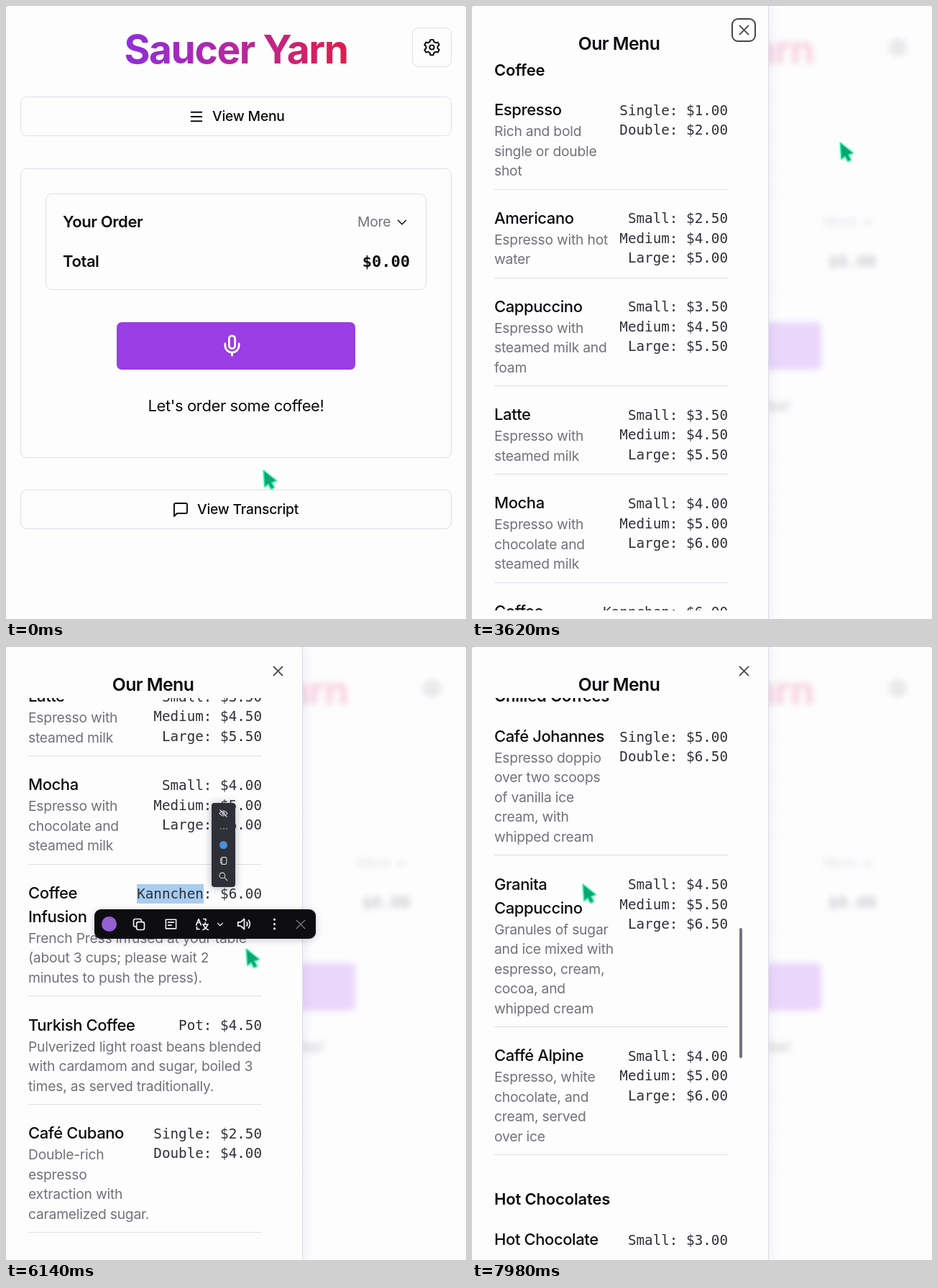
These frames come from a looping animation (640x853 px, 8 s). An HTML page:

```html
<!DOCTYPE html>
<html lang="en">
<head>
<meta charset="utf-8">
<title>Saucer Yarn</title>
<style>
  :root { --paper: #fdfdfe; --line: #dedee8; --ink: #0c0c10; --soft: #71717a; --mic: #fff; }
  html, body { margin: 0; width: 100%; height: 100%; overflow: hidden; background: #000; }
  #stage { position: relative; width: 640px; height: 853px; overflow: hidden; border-radius: 2px 2px 0 0;
    background: var(--paper); color: var(--ink); font: 400 19.25px/27.5px Inter, sans-serif;
    font-optical-sizing: none; letter-spacing: -.011em; }
  #stage div, svg { position: absolute; box-sizing: border-box; white-space: nowrap; }
  svg { fill: none; stroke: currentColor; stroke-linecap: round; stroke-linejoin: round; overflow: visible; }
  .page { inset: 0; background: var(--paper); }
  .box { border: 1px solid var(--line); border-radius: 9px; }
  .big { font-size: 22px; letter-spacing: -.018em; }
  .mono { font-family: "DejaVu Sans Mono", monospace; letter-spacing: 0; }
  .semi { font-weight: 600; }
  .medium { font-weight: 500; }
  .soft { color: var(--soft); }
  .title { left: 0; width: 640px; top: 26px; text-align: center; font-weight: 700; font-size: 55px; line-height: 68px; }
  .title span { letter-spacing: -.025em; color: transparent; background: linear-gradient(90deg, #8e2edb, #b627a0 50%, #e11d48);
    -webkit-background-clip: text; background-clip: text; }
  .mic { background: #9a3de4; border-radius: 7px; }
  .mic-icon { color: var(--mic); }

  .ghost { color: #cacace; --soft: #e4e4e8; --line: #f5f5f9; --mic: #e9d7fb; }
  .ghost > * { filter: blur(4.5px); }
  .ghost .title span { background-image: linear-gradient(90deg, #e9d6fb, #f9d0da); }
  .ghost .mic { background: #e9d7fb; }

  #sheet { left: 0; top: 0; width: 413px; height: 853px; background: var(--paper);
    border-right: 1px solid #dcdce6; box-shadow: 0 0 16px rgba(120, 120, 150, .16); }
  .sheet-title { left: 0; width: 409px; text-align: center; top: 39px; font-size: 24.75px; letter-spacing: -.022em; }
  #view { left: 0; top: 71px; width: 412px; height: 770px; overflow: hidden; }
  #list { left: 31px; top: 1.5px; width: 325px; }
  #stage #list div { position: relative; }
  #list .head { height: 33px; line-height: 33px; margin-bottom: 22.5px; letter-spacing: -.007em; }
  #list .item + .head { margin-top: 45.3px; }
  #list .item { padding-bottom: 11px; border-bottom: 1px solid var(--line); margin-bottom: 23.1px; }
  #list .item:has(+ .head) { margin-bottom: 0; }
  #list .name { line-height: 33px; }
  #stage #list .price { position: absolute; right: 0; top: 3.7px; text-align: right; color: #303038; }
  #thumb { left: 372px; width: 4px; height: 181px; border-radius: 2px; background: #72727e; }
  #ring { left: 361px; top: 17px; width: 34px; height: 33px; border: 2.5px solid #44444e; border-radius: 9px; }
  .close { color: #44444c; }
  .picked { background: #a9cdf0; padding: 2px 0; }
  .bar { left: 123px; top: 365px; width: 308px; height: 41px; border-radius: 9px; background: #0e0e12; color: #f2f2f5;
    box-shadow: 0 2px 10px rgba(60, 60, 90, .25); }
  .strip { left: 286px; top: 217px; width: 33px; height: 117px; border-radius: 4px; background: #2f2f38; color: #d8d8de;
    box-shadow: 0 1px 12px rgba(60, 60, 90, .4); }
  .dot { border-radius: 50%; }
  .blue { background: #4a90d6; }
  .violet { background: #9560d4; }
  .dim { color: #777780; }
  #cursor { left: 0; top: 0; width: 1px; height: 1px; fill: #0aa574; stroke: #2be39a; filter: drop-shadow(0 0 1.5px #7df0c0); }
</style>
</head>
<body>
<div id="stage"></div>
<script>
const stage = document.getElementById('stage');
const $ = id => document.getElementById(id);

const box = (x, y, w, h, cls) =>
  `<div class="${cls}" style="left:${x}px;top:${y}px;width:${w}px;height:${h}px"></div>`;
// Text is placed by its left edge (or right edge) and vertical centre.
const text = (x, cy, cls, str, side = 'left') =>
  `<div class="${cls}" style="${side}:${x}px;top:${cy - 13.75}px">${str}</div>`;
const icon = (cx, cy, size, body, weight = 2) =>
  `<svg viewBox="0 0 24 24" width="${size}" height="${size}" stroke-width="${weight}"
    style="left:${cx - size / 2}px;top:${cy - size / 2}px">${body}</svg>`;
const path = d => `<path d="${d}"/>`;

function gear() {
  const points = [];
  for (let tooth = 0; tooth < 6; tooth++)
    for (const [offset, r] of [[-21, 7.8], [-11, 10.4], [11, 10.4], [21, 7.8]]) {
      const a = (tooth * 60 + offset) * Math.PI / 180;
      points.push(`${(12 + r * Math.sin(a)).toFixed(2)} ${(12 - r * Math.cos(a)).toFixed(2)}`);
    }
  return path(`M${points.join('L')}Z`) + '<circle cx="12" cy="12" r="3"/>';
}

const chevron = path('M6 9l6 6 6-6');
const cross = path('M5 5l14 14M19 5L5 19');
const mic = path('M12 2a3 3 0 0 0-3 3v7a3 3 0 0 0 6 0V5a3 3 0 0 0-3-3ZM19 10v2a7 7 0 0 1-14 0v-2M12 19v3');
const bubble = path('M21 15a2 2 0 0 1-2 2H7l-4 4V5a2 2 0 0 1 2-2h14a2 2 0 0 1 2 2Z');
const copy = path('M16 8V6a3 3 0 0 0-3-3H6a3 3 0 0 0-3 3v7a3 3 0 0 0 3 3h2M11 8h7a3 3 0 0 1 3 3v7a3 3 0 0 1-3 3h-7a3 3 0 0 1-3-3v-7a3 3 0 0 1 3-3Z');
const note = path('M3 4h18v16H3ZM7 9h10M7 14h6');
const translate = path('M2 13L6 3l4 10M4 9h4M13 12h9M17 9v3M21 12q-2 7-8 9M14 13q2 6 8 8M14 3h4v3M3 16v4h4');
const speaker = path('M2 9h4l6-5v16l-6-5H2ZM16 9q2 3 0 6M19 6q4 6 0 12');
const dots = path('M12 4v.1M12 12v.1M12 20v.1');
const eyeOff = path('M2 12q10-13 20 0q-10 13-20 0M3 3l18 18') + '<circle cx="12" cy="12" r="3"/>';
const ellipsis = path('M4 12h.1M12 12h.1M20 12h.1');
const sheets = path('M8 3h9a3 3 0 0 1 3 3v12a3 3 0 0 1-3 3H8ZM8 6H5v12h3');
const search = path('M15 15l7 7') + '<circle cx="9" cy="9" r="7"/>';

const pageHtml =
  '<div class="title"><span>Saucer Yarn</span></div>' +
  box(565, 30, 55, 55, 'box btn') + icon(592.5, 57.5, 25, gear(), 1.9) +
  box(20, 126, 600, 55, 'box btn') + icon(264.5, 154, 22, path('M4 5.2h16M4 12h16M4 18.8h16')) +
  text(287, 154, 'medium', 'View Menu') +
  box(20, 226, 600, 403, 'box') + box(55, 261, 530, 134, 'box') +
  text(79, 301, 'big semi', 'Your Order') +
  text(489, 301, 'soft', 'More') + icon(551, 300.5, 22, chevron, 1.6) +
  text(79, 356, 'big semi', 'Total') +
  text(78, 356, 'big mono semi', '$0.00', 'right') +
  box(154, 440, 332, 66, 'mic') +
  `<div class="mic-icon">${icon(314.5, 472.5, 33, mic)}</div>` +
  '<div class="big" style="left:0;width:640px;text-align:center;top:543px">Let\'s order some coffee!</div>' +
  box(20, 673, 600, 55, 'box btn') + icon(243, 701, 24, bubble, 1.9) +
  text(266, 701, 'medium', 'View Transcript');

// A plain string is a section heading; an item is name, description, prices ("/" breaks a line).
const sizes = (...p) => ['Small', 'Medium', 'Large'].map((s, i) => p[i] && `${s}: $${p[i]}`).filter(Boolean).join('/');
const shots = (a, b) => `Single: $${a}/Double: $${b}`;
const menu = [
  'Coffee',
  ['Espresso', 'Rich and bold/single or double/shot', shots('1.00', '2.00')],
  ['Americano', 'Espresso with hot/water', sizes('2.50', '4.00', '5.00')],
  ['Cappuccino', 'Espresso with/steamed milk and/foam', sizes('3.50', '4.50', '5.50')],
  ['Latte', 'Espresso with/steamed milk', sizes('3.50', '4.50', '5.50')],
  ['Mocha', 'Espresso with/chocolate and/steamed milk', sizes('4.00', '5.00', '6.00')],
  ['Coffee/Infusion', 'French Press infused at your table/(about 3 cups; please wait 2/minutes to push the press).',
    '<span id="word">Kannchen</span>: $6.00'],
  ['Turkish Coffee', 'Pulverized light roast beans blended/with cardamom and sugar, boiled 3/times, as served traditionally.', 'Pot: $4.50'],
  ['Café Cubano', 'Double-rich/espresso/extraction with/caramelized sugar.', shots('2.50', '4.00')],
  'Chilled Coffees',
  ['Café Johannes', 'Espresso doppio/over two scoops/of vanilla ice/cream, with/whipped cream', shots('5.00', '6.50')],
  ['Granita/Cappuccino', 'Granules of sugar/and ice mixed with/espresso, cream,/cocoa, and/whipped cream', sizes('4.50', '5.50', '6.50')],
  ['Caffé Alpine', 'Espresso, white/chocolate, and/cream, served/over ice', sizes('4.00', '5.00', '6.00')],
  'Hot Chocolates',
  ['Hot Chocolate', 'Steamed milk/and cocoa', sizes('3.00')],
];
const lines = s => s.replace(/\/(?!span)/g, '<br>');
const listHtml = menu.map(row => typeof row === 'string'
  ? `<div class="head big semi">${row}</div>`
  : `<div class="item"><div class="name big medium">${lines(row[0])}</div>
     <div class="soft">${lines(row[1])}</div><div class="price mono">${lines(row[2])}</div></div>`).join('');

stage.innerHTML = `
  <div class="page" id="page">${pageHtml}</div>
  <div class="page ghost" id="ghost">${pageHtml}</div>
  <div id="sheet">
    <div class="sheet-title semi">Our Menu</div>
    <div id="view"><div id="list">${listHtml}</div></div>
    <div id="thumb"></div><div id="ring"></div>
    <div class="close">${icon(378, 33, 21, cross)}</div>
  </div>
  <div id="tools">
    <div class="strip">${icon(16.5, 14, 13, eyeOff)}${icon(16.5, 36, 12, ellipsis, 3)}${box(11, 53, 11, 11, 'dot blue')}
      ${icon(16.5, 80, 13, sheets)}${icon(16.5, 102, 13, search)}</div>
    <div class="bar">${box(10, 10, 21, 21, 'dot violet')}
      ${icon(62, 20.5, 20, copy)}${icon(106, 20.5, 19, note)}${icon(150, 20.5, 20, translate)}
      ${icon(175, 21, 14, chevron)}${icon(208, 20.5, 21, speaker)}${icon(250, 20.5, 19, dots, 4)}
      <div class="dim">${icon(287, 20.5, 20, cross, 1.6)}</div></div>
  </div>
  <svg id="cursor">
    <path id="arrow" stroke-width="1.6" d="M.5.5L2 23l5-4 4 7 4-2-3.500-7L18 14.500Z"/>
    <g id="beam" fill="none"><path stroke-width="4" d="M-4-11q4 0 4 3V8q0 3-4 3M4-11q-4 0-4 3V8q0 3 4 3"/>
      <path stroke="#0aa574" stroke-width="2" d="M-4-11q4 0 4 3V8q0 3-4 3M4-11q-4 0-4 3V8q0 3 4 3M-3 1h6"/></g>
  </svg>`;
const buttons = [...$('page').querySelectorAll('.btn')];

const cursorKeys = [
  [0, 358, 646], [250, 345, 698], [560, 290, 420], [820, 310, 150], [1000, 480, 60], [1250, 600, 35],
  [1560, 560, 690], [1660, 560, 690], [2100, 400, 90], [2260, 590, 57], [2460, 590, 57], [2780, 360, 690],
  [3060, 325, 187], [3110, 330, 165], [3220, 335, 163], [3620, 512, 190], [3900, 512, 190], [4300, 190, 395],
  [5040, 183, 401], [5500, 183, 401], [5720, 230, 345], [5880, 230, 345], [6140, 334, 420], [6260, 334, 420],
  [6480, 190, 270], [7020, 184, 263], [7260, 184, 263], [7500, 154, 330], [8000, 154, 330],
];
const scrollKeys = [[0, 0], [4300, 0], [4700, 143], [5020, 238], [5080, 238], [5440, 500], [6420, 500],
  [6700, 784], [7260, 784], [7960, 1308], [8000, 1308]];

const smooth = u => u * u * (3 - 2 * u);
const clamp = u => Math.min(1, Math.max(0, u));
const within = (t, a, b) => t >= a && t < b;

function track(keys, t, ease = u => u) {
  const i = keys.findIndex(k => k[0] > t);
  const a = keys[i - 1], b = keys[i];
  const u = ease((t - a[0]) / (b[0] - a[0]));
  return a.slice(1).map((v, n) => v + (b[n + 1] - v) * u);
}
const show = (id, on) => { $(id).style.visibility = on ? 'visible' : 'hidden'; };

function draw() {
  const t = performance.now() % 8000;
  const [x, y] = track(cursorKeys, t, smooth);
  const [scroll] = track(scrollKeys, t);
  const open = smooth(clamp((t - 3110) / 480));

  for (const b of buttons) {
    const over = within(x, b.offsetLeft, b.offsetLeft + b.offsetWidth) && within(y, b.offsetTop, b.offsetTop + b.offsetHeight);
    b.style.background = over ? '#f4f4f6' : '';
  }
  $('ghost').style.opacity = open;
  show('sheet', open > 0);
  $('sheet').style.transform = `translateX(${(open - 1) * 100}%)`;
  $('list').style.transform = `translateY(${-scroll}px)`;
  $('thumb').style.top = 75.7 + scroll * .2412 + 'px';
  $('thumb').style.opacity = within(t, 4300, 5700) || within(t, 6420, 6950) || t >= 7260 ? 1 : 0;
  $('ring').style.opacity = t < 5720 ? 1 : 0;
  $('word').className = within(t, 5760, 6340) ? 'picked' : '';
  show('tools', within(t, 5880, 6340));

  const beam = within(t, 5660, 5960) || within(t, 6480, 7280);
  $('arrow').style.display = beam ? 'none' : '';
  $('beam').style.display = beam ? '' : 'none';
  $('cursor').style.transform = `translate(${x}px, ${y}px)`;
  requestAnimationFrame(draw);
}
draw();
</script>
</body>
</html>
```
